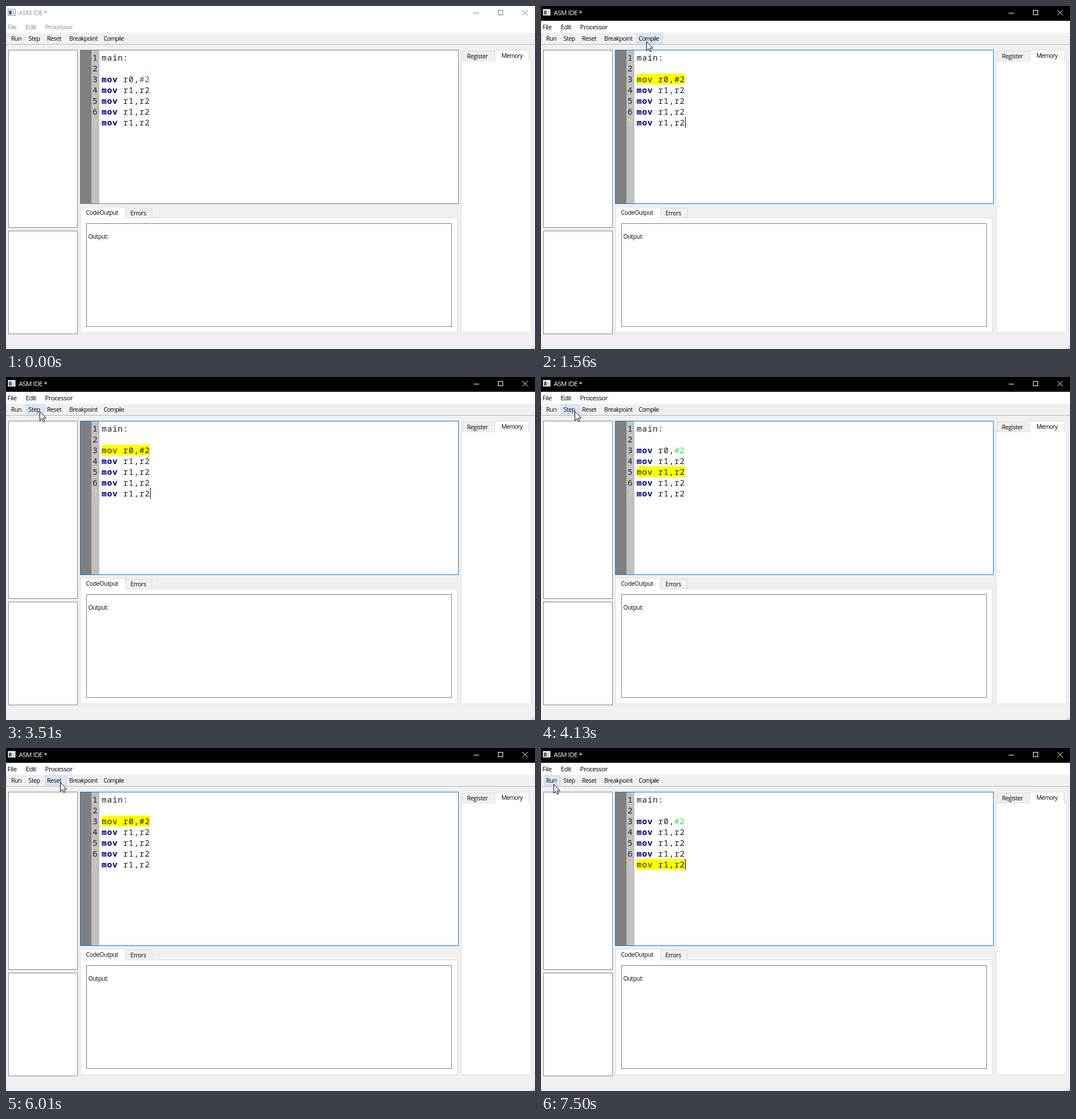
Write an HTML page that moves like this. It is 929x603 px and loops after 8000 ms.

```html
<!DOCTYPE html>
<html lang="en">
<head>
<meta charset="utf-8">
<title>ASM IDE</title>
<style>
html, body { margin: 0; width: 100%; height: 100%; overflow: hidden; background: #f0f0f0; }
svg {
  display: block; width: 100%; height: 100%;
  --bar: #fff; --title: #999; --menu: #8c8c8c; --control: #777; --edge: #7a7a7a;
}
svg, .hover, .caret, .cursor, .line, .literal { animation: 8s step-end infinite; }
svg { animation-name: focus; }

.title, .menu { font: 11.5px "Open Sans", sans-serif; letter-spacing: -.5px; }
.title { fill: var(--title); }
.menu { fill: var(--menu); }
.ui { font: 10.5px "Open Sans", sans-serif; letter-spacing: -.38px; }
.tight { letter-spacing: -.7px; }
.code { font: 14.5px "Noto Sans Mono", monospace; letter-spacing: .75px; fill: #222; }
.code b, .op { font-weight: 700; fill: #000080; }
.box { fill: #fff; stroke: #828790; }
.pane { fill: #fff; stroke: #dcdcdc; }
.tab { fill: #f0f0f0; stroke: #d9d9d9; }
.controls { fill: none; stroke: var(--control); }
.literal { fill: #2f7d32; animation-name: literal; }
.hover { stroke: #c0dcf3; fill: #d8e6f2; animation-name: hover, press; }
.caret { animation-name: caret; }
.cursor { animation-name: cursor; }
.line { visibility: hidden; }
.line rect { fill: #ff0; }
.l3 { animation-name: l3; }
.l4 { animation-name: l4; }
.l5 { animation-name: l5; }
.l6 { animation-name: l6; }
.l7 { animation-name: l7; }

@keyframes focus {
  18.5%, 100% { --bar: #000; --title: #fff; --menu: #000; --control: #fff; --edge: #0078d7; }
}
@keyframes literal { 47.875%, 100% { fill: #2fe03a; } }
@keyframes l3 {
  0%, 47.875%, 92.75%, 100% { visibility: hidden; }
  19.375%, 75.125% { visibility: visible; }
}
@keyframes l4 { 0%, 51.625%, 100% { visibility: hidden; } 47.875% { visibility: visible; } }
@keyframes l5 { 0%, 55.5%, 100% { visibility: hidden; } 51.625% { visibility: visible; } }
@keyframes l6 { 0%, 58.5%, 100% { visibility: hidden; } 55.5% { visibility: visible; } }
@keyframes l7 {
  0%, 75.125% { visibility: hidden; }
  58.5%, 92.75%, 100% { visibility: visible; }
}
@keyframes caret {
  0%, 25.25%, 37.875%, 49.75%, 62.375%, 74.125%, 86.875% { visibility: hidden; }
  19.375%, 31.125%, 43.875%, 56.5%, 68.25%, 81%, 93.75%, 100% { visibility: visible; }
}
@keyframes hover {
  0%, 82.875% { visibility: hidden; }
  15.625% { visibility: visible; x: 167.5px; width: 46px; }
  26.25% { x: 107.5px; width: 59px; }
  29.125% { x: 68.5px; width: 38px; }
  40.875% { x: 35.5px; width: 32px; }
  68.25% { x: 68.5px; width: 38px; }
  86.875%, 100% { visibility: visible; x: 5.5px; width: 28px; }
}
@keyframes press {
  0%, 19.375%, 51.625%, 55.5%, 58.5%, 75.125%, 92.75%, 100% { fill: #d8e6f2; stroke: #c0dcf3; }
  18.5%, 49.75%, 53.625%, 57.5%, 74.125%, 91.75% { fill: #c0dcf3; stroke: #90c8f6; }
}
@keyframes cursor {
  0% { transform: translate(929px, 620px); }
  4.625% { transform: translate(787px, 595px); }
  5.625% { transform: translate(673px, 495px); }
  6.625% { transform: translate(571px, 405px); }
  7.625% { transform: translate(480px, 326px); }
  8.625% { transform: translate(402px, 258px); }
  9.625% { transform: translate(336px, 200px); }
  10.625% { transform: translate(282px, 152px); }
  11.625% { transform: translate(240px, 115px); }
  12.625% { transform: translate(210px, 89px); }
  13.625% { transform: translate(192px, 73px); }
  14.625% { transform: translate(186px, 68px); }
  15.625% { transform: translate(186px, 64px); }
  16.625% { transform: translate(185px, 62px); }
  25.25% { transform: translate(179px, 62px); }
  26.25% { transform: translate(163px, 61px); }
  27.125% { transform: translate(144px, 61px); }
  28.125% { transform: translate(123px, 62px); }
  29.125% { transform: translate(106px, 62px); }
  30.125% { transform: translate(96px, 62px); }
  31.125% { transform: translate(91px, 62px); }
  32.125% { transform: translate(89px, 62px); }
  37.875% { transform: translate(86px, 62px); }
  38.875% { transform: translate(80px, 61px); }
  39.875% { transform: translate(72px, 61px); }
  40.875% { transform: translate(66px, 60px); }
  41.875% { transform: translate(62px, 60px); }
  42.875% { transform: translate(60px, 60px); }
  43.875% { transform: translate(59px, 60px); }
  67.25% { transform: translate(66px, 60px); }
  68.25% { transform: translate(84px, 60px); }
  69.25% { transform: translate(100px, 60px); }
  71.125% { transform: translate(97px, 60px); }
  72.375% { transform: translate(95px, 60px); }
  82.875% { transform: translate(82px, 70px); }
  83.875% { transform: translate(62px, 77px); }
  85.875% { transform: translate(44px, 74px); }
  86.875% { transform: translate(28px, 66px); }
  88%, 100% { transform: translate(22px, 63px); }
}
</style>
</head>
<body>
<svg viewBox="0 0 929 603">
  <rect width="929" height="603" fill="#f0f0f0"/>

  <!-- title bar and menu -->
  <rect y="26" width="929" height="21" fill="#fff"/>
  <rect width="929" height="26" style="fill:var(--bar)"/>
  <rect x="3.5" y="5.5" width="13" height="11" fill="#fff" stroke="#8a8f96"/>
  <rect x="5" y="8" width="5" height="7" fill="#4d6b74"/>
  <rect x="11" y="8" width="4" height="7" fill="#c9d0d6"/>
  <text class="title" x="22.5" y="16">ASM IDE *</text>
  <g class="controls">
    <path d="M821 12.5h10M864.5 7.5h8v8h-8z" shape-rendering="crispEdges"/>
    <path d="M907 7l9.5 9.5M916.5 7l-9.5 9.5"/>
  </g>
  <g class="menu">
    <text x="2.5" y="41">File</text>
    <text x="34.5" y="41">Edit</text>
    <text x="68.5" y="41">Processor</text>
  </g>

  <!-- toolbar -->
  <path d="M.5 51v13" stroke="#a0a0a0" stroke-dasharray="1 2"/>
  <path d="M0 67.5h929" stroke="#b4b4b4"/>
  <rect class="hover" x="167.5" y="48.5" width="46" height="17"/>
  <g class="ui">
    <text x="9" y="61">Run</text>
    <text x="39.5" y="61">Step</text>
    <text x="72" y="61">Reset</text>
    <text x="111" y="61">Breakpoint</text>
    <text class="tight" x="171.5" y="61">Compile</text>
  </g>

  <!-- side panels -->
  <rect class="box" x="4.5" y="77.5" width="121" height="312"/>
  <rect class="box" x="4.5" y="395.5" width="121" height="181"/>
  <rect class="tab" x="801.5" y="79.5" width="57" height="17"/>
  <rect class="pane" x="799.5" y="96.5" width="123" height="478"/>
  <path class="pane" d="M858.5 97V77.5h60V97"/>
  <g class="ui">
    <text x="809.5" y="92">Register</text>
    <text class="tight" x="870" y="91">Memory</text>
  </g>

  <!-- output -->
  <rect class="tab" x="209.5" y="355.5" width="47" height="17"/>
  <rect class="pane" x="130.5" y="372.5" width="662" height="202"/>
  <path class="pane" d="M130.5 373V353.5h79V373"/>
  <rect x="141.5" y="382.5" width="641" height="181" fill="#fff" stroke="#7a7a7a"/>
  <g class="ui">
    <text x="140.5" y="367">CodeOutput</text>
    <text x="218.5" y="368">Errors</text>
    <text x="144.5" y="409">Output:</text>
  </g>

  <!-- editor -->
  <rect x="130.5" y="77.5" width="664" height="270" fill="#fff"/>
  <rect x="131" y="78" width="19" height="269" fill="#808080"/>
  <rect x="150" y="78" width="14" height="269" fill="#c0c0c0"/>
  <rect x="130.5" y="77.5" width="664" height="270" fill="none" style="stroke:var(--edge)"/>
  <g class="code">
    <text x="152" y="96">1</text>
    <text x="152" y="115">2</text>
    <text x="152" y="134">3</text>
    <text x="152" y="153">4</text>
    <text x="152" y="172">5</text>
    <text x="152" y="191">6</text>
    <text x="152" y="210" fill="#ffd27a">7</text>
    <text x="168" y="96">main:</text>
    <text x="168" y="134"><tspan class="op">mov</tspan> r0,<tspan class="literal">#2</tspan></text>
    <text x="168" y="153"><tspan class="op">mov</tspan> r1,r2</text>
    <text x="168" y="172"><tspan class="op">mov</tspan> r1,r2</text>
    <text x="168" y="191"><tspan class="op">mov</tspan> r1,r2</text>
    <text x="168" y="210"><tspan class="op">mov</tspan> r1,r2</text>
    <g class="line l3"><rect x="168" y="119" width="85" height="19"/><text x="168" y="134">mov r0,#2</text></g>
    <g class="line l4"><rect x="168" y="138" width="85" height="19"/><text x="168" y="153">mov r1,r2</text></g>
    <g class="line l5"><rect x="168" y="157" width="85" height="19"/><text x="168" y="172">mov r1,r2</text></g>
    <g class="line l6"><rect x="168" y="176" width="85" height="19"/><text x="168" y="191">mov r1,r2</text></g>
    <g class="line l7"><rect x="168" y="195" width="85" height="19"/><text x="168" y="210">mov r1,r2</text></g>
  </g>
  <rect class="caret" x="253" y="195" width="1" height="19"/>

  <!-- size grip -->
  <path d="M926 598h2v2h-2zM926 601h2v2h-2zM923 601h2v2h-2z" fill="#bfbfbf"/>

  <path class="cursor" d="M.5 .8V16.4L4 13.1l2.5 5.4 2.4-1-2.4-5.3h4.9z" fill="#fff" stroke="#000"/>
</svg>
</body>
</html>
```
